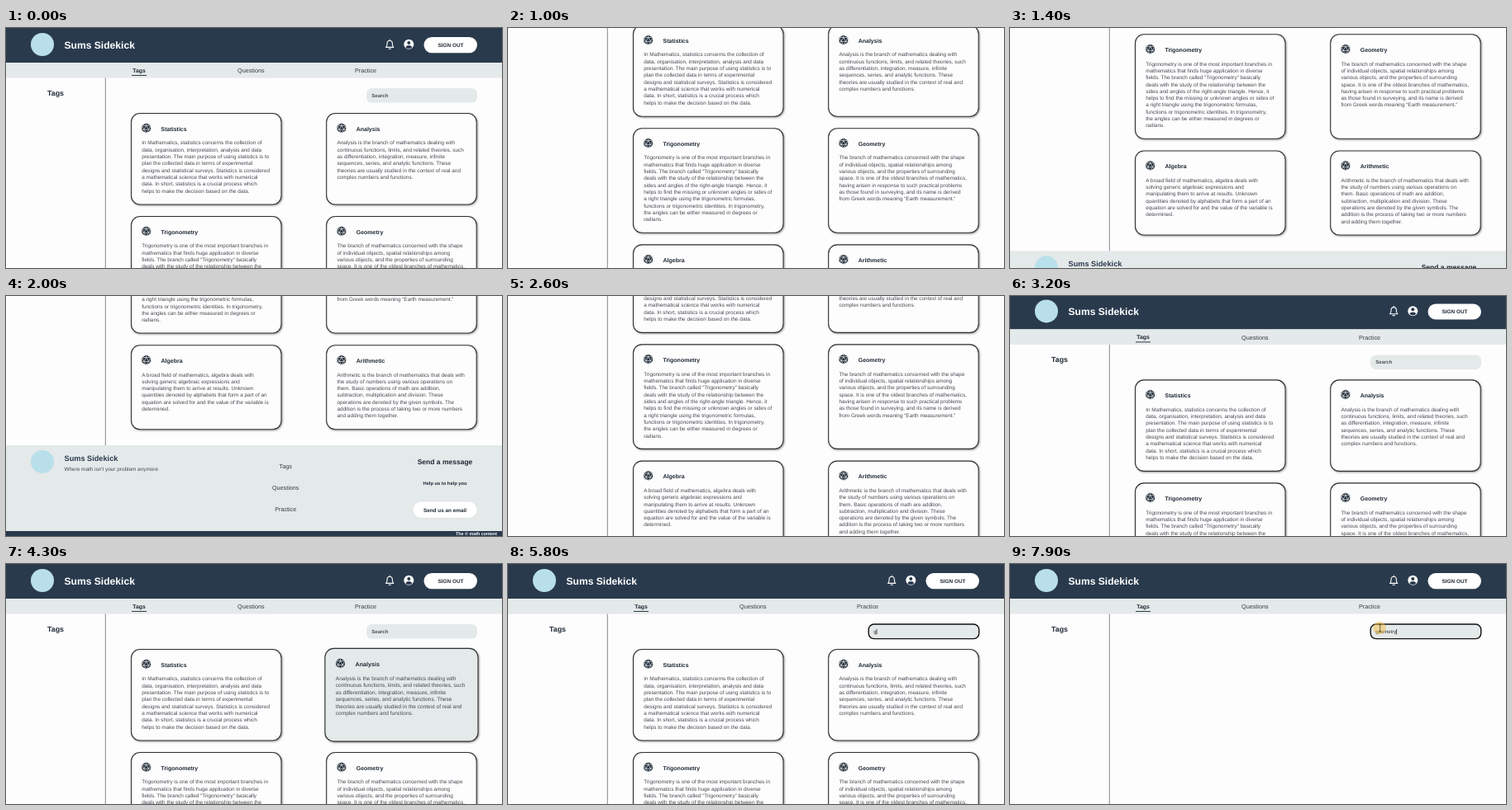
Animation of 600x291 px, one loop 8000 ms. Source, as an HTML page:

```html
<!DOCTYPE html>
<html lang="en">
<head>
<meta charset="utf-8">
<title>Sums Sidekick</title>
<style>
  html, body { margin: 0; height: 100%; overflow: hidden; background: #fefdfe; }
  svg { display: block; width: 600px; height: 291px; font-family: "Liberation Sans", Arial, sans-serif; text-rendering: geometricPrecision; }
  .box { stroke: #303030; stroke-width: 1.1; filter: drop-shadow(1.6px 1.6px 1px #0006); }
  .card { transform-box: fill-box; transform-origin: center; }
</style>
</head>
<body>
<svg id="stage" viewBox="0 0 600 291"></svg>
<script>
const LOOP = 8000, MAX_SCROLL = 310;
const NAVY = '#2a3a4d', GREY = '#e4e9e9', PAPER = '#fefdfe', INK = '#1f2a36', BODY = '#444a50';
const BRAND = 'Sums Sidekick';

const cards = [
  { title: 'Statistics', x: 151.5, y: 103.5, h: 110.5, text: `In Mathematics, statistics concerns the collection of
data, organisation, interpretation, analysis and data
presentation. The main purpose of using statistics is to
plan the collected data in terms of experimental
designs and statistical surveys. Statistics is considered
a mathematical science that works with numerical
data. In short, statistics is a crucial process which
helps to make the decision based on the data.` },
  { title: 'Analysis', x: 387.7, y: 103.5, h: 110.5, text: `Analysis is the branch of mathematics dealing with
continuous functions, limits, and related theories, such
as differentiation, integration, measure, infinite
sequences, series, and analytic functions. These
theories are usually studied in the context of real and
complex numbers and functions.` },
  { title: 'Trigonometry', x: 151.5, y: 228.5, h: 126.5, text: `Trigonometry is one of the most important branches in
mathematics that finds huge application in diverse
fields. The branch called “Trigonometry” basically
deals with the study of the relationship between the
sides and angles of the right-angle triangle. Hence, it
helps to find the missing or unknown angles or sides of
a right triangle using the trigonometric formulas,
functions or trigonometric identities. In trigonometry,
the angles can be either measured in degrees or
radians.` },
  { title: 'Geometry', x: 387.7, y: 228.5, h: 126.5, text: `The branch of mathematics concerned with the shape
of individual objects, spatial relationships among
various objects, and the properties of surrounding
space. It is one of the oldest branches of mathematics,
having arisen in response to such practical problems
as those found in surveying, and its name is derived
from Greek words meaning “Earth measurement.”` },
  { title: 'Algebra', x: 151.5, y: 369.7, h: 102, text: `A broad field of mathematics, algebra deals with
solving generic algebraic expressions and
manipulating them to arrive at results. Unknown
quantities denoted by alphabets that form a part of an
equation are solved for and the value of the variable is
determined.` },
  { title: 'Arithmetic', x: 387.7, y: 369.7, h: 102, text: `Arithmetic is the branch of mathematics that deals with
the study of numbers using various operations on
them. Basic operations of math are addition,
subtraction, multiplication and division. These
operations are denoted by the given symbols. The
addition is the process of taking two or more numbers
and adding them together.` },
];

// y is the middle of the capitals
const label = (text, x, y, size, fill, bold = true, anchor = 'start') =>
  `<text x="${x}" y="${y + size * .36}" font-size="${size}" fill="${fill}" text-anchor="${anchor}"${bold ? ' font-weight="700"' : ''}>${text}</text>`;
const rect = (x, y, w, h, fill, rx = 0, more = '') =>
  `<rect x="${x}" y="${y}" width="${w}" height="${h}" rx="${rx}" fill="${fill}" ${more}/>`;
const circle = (x, y, r, fill) => `<circle cx="${x}" cy="${y}" r="${r}" fill="${fill}"/>`;

const dice = (x, y) => `<g transform="translate(${x} ${y})">
  <path d="M0-6 5.3-3V3L0 6-5.3 3V-3Z" fill="${INK}"/>
  <path d="M0-2.8 2.9 2H-2.9ZM0-6V-2.8M-5.3-3 0-2.8 5.3-3 2.9 2 5.3 3M-5.3-3-2.9 2-5.3 3M-2.9 2 0 6 2.9 2" fill="none" stroke="#eef1f3" stroke-width=".7"/></g>`;

const cardMarkup = ({ title, x, y, h, text }) => `<g class="card">
  ${rect(x, y, 181.5, h, PAPER, 10.5, 'class="box"')}
  ${dice(x + 18.2, y + 17.7)}
  ${label(title, x + 36, y + 18.6, 7, INK)}
  ${text.split('\n').map((line, i) => label(line, x + 12.7, y + 35.5 + i * 8.32, 6.4, BODY, false)).join('')}
</g>`;

const stage = document.getElementById('stage');
stage.innerHTML = `
${rect(0, 0, 600, 291, PAPER)}
<g id="page">
  ${rect(0, 0, 600, 42, NAVY)}
  ${circle(44, 20, 14, '#b9e0ea')}
  ${label(BRAND, 70.5, 20.5, 12.1, '#fff')}
  <path d="M459.6 23.4c1.3-1 1.4-2.2 1.4-4.2 0-2.6 1.2-4 3.2-4s3.200 1.400 3.200 4c0 2 .1 3.200 1.400 4.200ZM464.200 15.200V14M463 25.200h2.400" fill="none" stroke="#fff" stroke-width="1.100" stroke-linecap="round" stroke-linejoin="round"/>
  ${circle(487.3, 19.800, 6, '#fff')}
  ${circle(487.3, 17.900, 2, NAVY)}
  <path d="M483.300 23.200a4.200 3.200 0 0 1 8 0 5.200 5.200 0 0 1-8 0Z" fill="${NAVY}"/>
  ${rect(505.5, 11, 64.5, 19.2, '#fff', 9.6)}
  ${label('SIGN OUT', 538, 20.6, 6.4, INK, true, 'middle')}

  ${rect(0, 42, 600, 18.5, GREY)}
  ${label('Tags', 161, 51.5, 6.9, INK, true, 'middle')}
  ${rect(152, 57, 18, .9, INK)}
  ${label('Questions', 296.3, 51.9, 7.2, '#333b43', false, 'middle')}
  ${label('Practice', 435, 51.9, 7.2, '#333b43', false, 'middle')}

  ${rect(119.8, 60.5, 1, 431, '#86898c')}
  ${label('Tags', 60, 78.3, 8.9, INK, true, 'middle')}
  <rect id="field" rx="6.5" fill="${GREY}"/>
  <text id="query" x="442.3" y="84" font-size="6"></text>
  <rect id="caret" y="79" width=".7" height="6.5" fill="#111"/>
  <g id="cards">${cards.map(cardMarkup).join('')}</g>

  ${rect(0, 491, 600, 104, GREY)}
  ${circle(44, 511, 14, '#b9e0ea')}
  ${label(BRAND, 70.5, 506.8, 9.2, NAVY)}
  ${label("Where math isn't your problem anymore", 70.5, 519.3, 6.4, BODY, false)}
  ${['Tags', 'Questions', 'Practice'].map((s, i) => label(s, 338.2, 516.3 + i * 26.3, 7.2, '#333b43', false, 'middle')).join('')}
  ${label('Send a message', 531, 511, 8.5, INK, true, 'middle')}
  ${label('Help us to help you', 531, 537.2, 5.75, INK, true, 'middle')}
  ${rect(492, 559, 78, 20.500, '#fff', 10.2, 'stroke="#d5dada" stroke-width=".6"')}
  ${label('Send us an email', 531, 569.3, 6.4, INK, true, 'middle')}
  ${rect(0, 595, 600, 6, NAVY)}
  ${label('The © math content', 594, 598.3, 5.35, '#fff', true, 'end')}
</g>
<g id="pointer">
  ${circle(447, 77.500, 7.8, '#f3bd45" fill-opacity=".5')}
  <path d="M446 73h3.400M447.700 73v9M446 82h3.400" fill="none" stroke="#4a4020" stroke-width=".8"/>
</g>`;

const [page, field, query, caret, cardLayer, pointer] =
  ['page', 'field', 'query', 'caret', 'cards', 'pointer'].map(id => document.getElementById(id));
const cardNodes = [...document.querySelectorAll('.card')];

const ramp = (t, from, to) => Math.min(1, Math.max(0, (t - from) / (to - from)));
const easeOut = (p, power) => 1 - (1 - p) ** power;
const show = (node, on) => node.setAttribute('visibility', on ? 'visible' : 'hidden');

const FOCUS = 4900, EMPTY = 6800, POINTER = 7800;
const WORD = 'geometry', KEYS = [5800, 6200, 6800, 7000, 7100, 7200, 7300, 7500];

function drawSearch(t) {
  const focused = t >= FOCUS;
  const typed = KEYS.filter(k => k <= t).length;
  const box = focused
    ? { x: 436.2, y: 73, width: 133.6, height: 17.6, stroke: '#111', 'stroke-width': 1.4 }
    : { x: 436, y: 73, width: 134, height: 17.6, stroke: 'none' };
  for (const name in box) field.setAttribute(name, box[name]);

  query.textContent = typed ? WORD.slice(0, typed) : 'Search';
  query.setAttribute('font-weight', typed ? 400 : 700);
  query.setAttribute('fill', typed ? '#333' : '#4a4f55');

  const lastInput = typed ? KEYS[typed - 1] : FOCUS;
  caret.setAttribute('x', 442.3 + (typed ? query.getComputedTextLength() : 0));
  show(caret, focused && (t - lastInput) % 1000 < 500);
}

function drawHover(i, amount) {
  cardNodes[i].style.transform = `scale(${1 + .02 * amount})`;
  cardNodes[i].firstElementChild.style.fill = `color-mix(in srgb, ${GREY} ${amount * 100}%, ${PAPER})`;
}

function draw(t) {
  const down = easeOut(ramp(t, 700, 2000), 1.61);
  const up = easeOut(ramp(t, 2400, 3300), 2.4);
  page.setAttribute('transform', `translate(0 ${-MAX_SCROLL * (down - up)})`);
  drawHover(3, ramp(t, 3800, 4000) - ramp(t, 4000, 4200));
  drawHover(1, ramp(t, 4000, 4200) - ramp(t, 4500, 4700));
  drawSearch(t);
  show(cardLayer, t < EMPTY);
  show(pointer, t >= POINTER);
}

function tick() {
  draw(Math.floor(performance.now() % LOOP / 100) * 100);
  requestAnimationFrame(tick);
}
tick();
</script>
</body>
</html>
```
